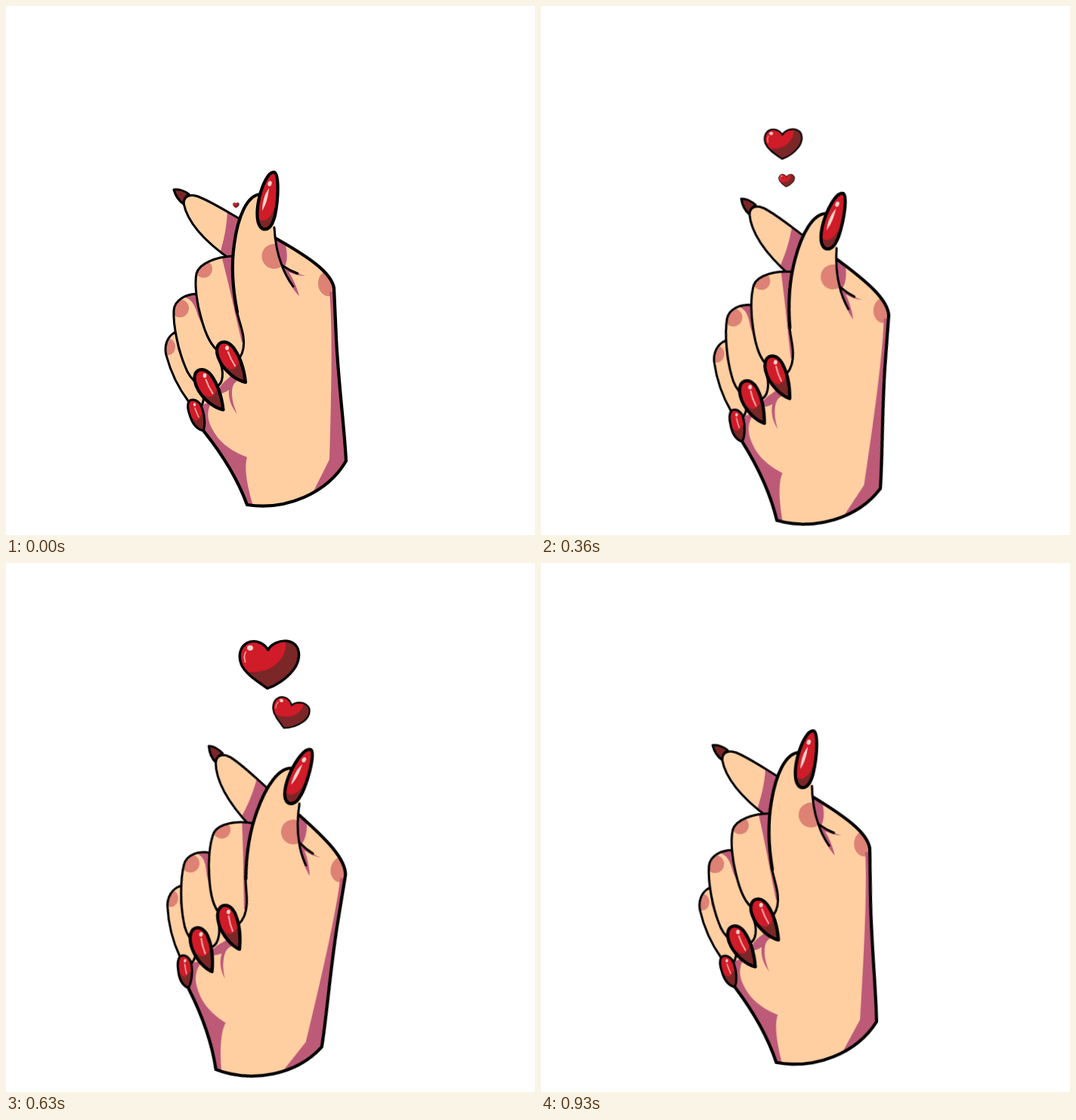
An HTML page for the animation above (0.96 s loop, 700x700 px).

```html
<!DOCTYPE html>
<html lang="en">
<head>
<meta charset="utf-8">
<title>Finger heart</title>
<style>
html, body { margin: 0; width: 100%; height: 100%; overflow: hidden; background: #fff; }
svg { display: block; width: 100vw; height: 100vh; }
path { stroke-linecap: round; stroke-linejoin: round; }
.skin { fill: #ffcfa2; }
.shade { fill: #bd5a78; }
.blush { fill: #dd8274; }
.red { fill: #d01b28; }
.dark { fill: #7b2727; }
.shine { fill: #f9d3cb; }
.glint { fill: none; stroke: #f3a9a4; stroke-width: 2.2; }
.line { fill: none; stroke: #000; stroke-width: 3; }
.bold { stroke-width: 4.2; }

.hand { transform-origin: 337.5px 440px; animation: sway 960ms infinite; }
.big { animation: rise 960ms infinite; }
.small { animation: drift 960ms infinite; }

/* Every segment advances in 30 ms steps. */
@keyframes sway {
  0%      { transform: translate(0, 0) rotate(0deg); animation-timing-function: steps(8); }
  25%     { transform: translate(-8.5px, 14.3px) rotate(15.8deg); animation-timing-function: steps(7); }
  46.875% { transform: translate(39.5px, 32px) rotate(0deg); animation-timing-function: steps(8); }
  71.875% { transform: translate(-8.5px, 14.3px) rotate(15.8deg); animation-timing-function: steps(9); }
  100%    { transform: translate(0, 0) rotate(0deg); }
}
@keyframes rise {
  0%      { transform: translate(304.3px, 263.5px) scale(.083); animation-timing-function: steps(8); }
  25%     { transform: translate(308.5px, 205.7px) scale(.362); animation-timing-function: steps(4); }
  37.5%   { transform: translate(320.5px, 182.5px) scale(.5); animation-timing-function: steps(5); }
  53.125% { transform: translate(336px, 155.5px) scale(.665); animation-timing-function: steps(4); }
  65.625% { transform: translate(348.3px, 134.2px) scale(.793); animation-timing-function: steps(6); }
  84.375% { transform: translate(363px, 96px) scale(1); animation-timing-function: steps(3); }
  93.74%  { transform: translate(370px, 73.5px) scale(1.105); animation-timing-function: step-end; }
  93.75%, 100% { transform: translate(370px, 73.5px) scale(0); animation-timing-function: step-end; }
}
@keyframes drift {
  0%, 24.99% { transform: translate(320.5px, 256px) rotate(-5deg) scale(0); animation-timing-function: step-end; }
  25%     { transform: translate(320.5px, 256px) rotate(-5deg) scale(.09); animation-timing-function: steps(4); }
  37.5%   { transform: translate(325px, 231px) rotate(2deg) scale(.21); animation-timing-function: steps(5); }
  53.125% { transform: translate(350.4px, 214px) rotate(10deg) scale(.37); animation-timing-function: steps(4); }
  65.625% { transform: translate(375.3px, 200px) rotate(18deg) scale(.495); animation-timing-function: steps(6); }
  84.375% { transform: translate(417.5px, 178.5px) rotate(27deg) scale(.67); animation-timing-function: steps(3); }
  93.74%  { transform: translate(443.5px, 168px) rotate(32deg) scale(.76); animation-timing-function: step-end; }
  93.75%, 100% { transform: translate(443.5px, 168px) rotate(32deg) scale(0); animation-timing-function: step-end; }
}
</style>
</head>
<body>
<svg viewBox="0 0 700 700">
  <defs>
    <path id="heartShape" d="M-2-24C-9-37-25-42-37-36C-49-29-52-15-47-1C-40 16-20 28-3 40C12 35 30 23 41 8C51-5 52-22 45-31C37-41 22-41 11-36C5-33 0-29-2-24Z"/>
    <path id="indexShape" d="M235 261C235 252 244 248 254 252C272 259 292 272 310 282L304 340L298 336C272 318 241 291 235 261Z"/>
    <path id="palmShape" d="M336 249C319 251 307 278 302 315C297 350 301 380 306 405L290 440L240 525L262 563C290 598 308 630 319 660C370 668 425 645 450 602C448 560 440 500 437 440L434 373C430 352 400 332 358 308L355 293L348 250Z"/>
    <path id="pinkyShape" d="M223 432C213 438 209 450 212 462C218 485 230 508 242 524L258 530C264 521 263 506 252 494L232 440Z"/>
    <path id="ringShape" d="M253 381C238 381 223 389 222 403C221 425 229 458 237 477C241 488 248 496 254 500L278 504C288 500 289 488 284 472L258 400Z"/>
    <path id="middleShape" d="M299 331C279 332 256 340 252 354C249 370 253 395 258 412C264 435 273 452 283 458L309 466C316 457 315 440 311 428C303 400 298 370 299 331Z"/>
    <path id="thumbNailShape" d="M355 220C361 222 361 252 356 277C352 293 346 297 340 295C331 291 331 272 335 254C339 237 347 219 355 220Z"/>
    <path id="nailShape" d="M280 450C284 442 294 443 301 452C309 463 315 480 317 498C304 495 291 484 284 472C279 463 278 455 280 450Z"/>
    <path id="pinkyNailShape" d="M242 523C248 518 256 523 259 531C263 541 264 555 261 562C252 560 246 551 243 541C240 533 240 527 242 523Z"/>

    <clipPath id="heartClip"><use href="#heartShape"/></clipPath>
    <clipPath id="indexClip"><use href="#indexShape"/></clipPath>
    <clipPath id="palmClip"><use href="#palmShape"/></clipPath>
    <clipPath id="pinkyClip"><use href="#pinkyShape"/></clipPath>
    <clipPath id="ringClip"><use href="#ringShape"/></clipPath>
    <clipPath id="middleClip"><use href="#middleShape"/></clipPath>
    <clipPath id="thumbNailClip"><use href="#thumbNailShape"/></clipPath>
    <clipPath id="nailClip"><use href="#nailShape"/></clipPath>
    <clipPath id="pinkyNailClip"><use href="#pinkyNailShape"/></clipPath>

    <g id="heart">
      <use href="#heartShape" class="red"/>
      <path class="dark" clip-path="url(#heartClip)" d="M27-42C33-8 0 20-44 11L-30 50H60V-42Z"/>
      <ellipse class="shine" cx="-32" cy="-27.5" rx="5" ry="4.3"/>
      <path class="glint" d="M-39-21C-42-16-42-10-40-4"/>
      <use href="#heartShape" class="line bold"/>
    </g>
    <g id="nail">
      <use href="#nailShape" class="red"/>
      <path class="dark" clip-path="url(#nailClip)" d="M280 466C292 482 304 488 309 468L322 475V502H290Z"/>
      <ellipse class="shine" cx="292.5" cy="452.5" rx="2.4" ry="3"/>
      <path class="glint" d="M294 458Q297 467 303 476"/>
      <use href="#nailShape" class="line bold"/>
    </g>
  </defs>

  <use class="big" href="#heart"/>
  <use class="small" href="#heart"/>

  <g class="hand">
    <!-- index finger -->
    <use href="#indexShape" class="skin"/>
    <path class="shade" clip-path="url(#indexClip)" d="M293 270C292 295 288 310 283 328L310 345V270Z"/>
    <use href="#indexShape" class="line"/>
    <path class="dark" d="M222 243C229 242 237 245 242 249C237 252 235 256 235 262C229 258 224 250 222 243Z"/>
    <path class="line" d="M222 243C229 242 237 245 242 249C237 252 235 256 235 262C229 258 224 250 222 243Z"/>

    <!-- palm and thumb -->
    <use href="#palmShape" class="skin"/>
    <g clip-path="url(#palmClip)">
      <path class="blush" d="M358 315A16.5 16.5 0 1 0 364 345Z"/>
      <ellipse class="blush" cx="427" cy="367" rx="14" ry="17"/>
      <path class="shade" d="M428 378C432 420 431 500 428 600L404 648L410 665H460V378Z"/>
      <path class="shade" d="M258 528L272 524C266 534 266 546 271 556C281 577 296 588 319 597C315 610 318 632 328 665H300L250 560Z"/>
      <path class="shade" d="M262 530L288 498L306 482L314 492C302 496 299 502 299 512C299 522 302 531 306 540C298 530 294 520 295 508C287 514 277 512 270 528Z"/>
      <path class="shade" d="M354 300L370 317C373 330 372 340 368 346C361 335 357 320 354 300Z"/>
    </g>
    <path class="shade" d="M365 343C376 351 386 355 397 357C388 357 380 355 374 352C380 361 385 372 388 384C380 375 370 362 365 343Z"/>
    <path class="line" d="M355 293C356 312 359 328 365 343C369 355 375 364 380 371M365 343Q375 350 386 354" stroke-width="2"/>
    <path class="line bold" d="M358 308C400 332 430 352 434 373L437 440C440 500 448 560 450 602C425 645 370 668 319 660C308 630 290 598 262 563"/>

    <!-- curled fingers -->
    <use href="#pinkyShape" class="skin"/>
    <g clip-path="url(#pinkyClip)">
      <ellipse class="blush" cx="215" cy="451" rx="9" ry="11"/>
      <path class="shade" d="M214 438L224 434L227 454L234 470V430H216Z"/>
    </g>
    <path class="line" d="M223 432C213 438 209 450 212 462C218 485 230 508 242 524M252 497C262 506 264 521 258 530"/>

    <use href="#ringShape" class="skin"/>
    <g clip-path="url(#ringClip)">
      <circle class="blush" cx="230" cy="400" r="12"/>
      <path class="shade" d="M234 385C246 387 250 396 254 410L268 440V375H240Z"/>
    </g>
    <path class="line" d="M253 381C238 381 223 389 222 403C221 425 229 458 237 477C241 488 248 496 254 500M282 468C289 484 288 500 278 504"/>

    <use href="#middleShape" class="skin"/>
    <g clip-path="url(#middleClip)">
      <circle class="blush" cx="261.500" cy="348" r="11.500"/>
      <path class="shade" d="M284 326C290 350 297 378 303 406L312 445H320V326Z"/>
    </g>
    <path class="line" d="M299 331C279 332 256 340 252 354C249 370 253 395 258 412C264 435 273 452 283 458M305 402C308 416 312 425 314 437C316 450 313 460 309 466"/>
    <path class="line bold" stroke-width="3.600" d="M336 249C319 251 307 278 302 315C297 350 301 380 306 405"/>

    <!-- nails -->
    <use href="#nail"/>
    <use href="#nail" x="-29.500" y="36.500"/>
    <use href="#pinkyNailShape" class="red"/>
    <path class="dark" clip-path="url(#pinkyNailClip)" d="M241 538C249 550 256 553 258 540L266 545V565H248Z"/>
    <ellipse class="shine" cx="249.500" cy="527.500" rx="1.700" ry="2.200"/>
    <path class="glint" d="M250 532Q252 538 255 544" style="stroke-width:1.600"/>
    <use href="#pinkyNailShape" class="line"/>

    <use href="#thumbNailShape" class="red"/>
    <path class="dark" clip-path="url(#thumbNailClip)" d="M330 280C341 288 350 284 357 262L362 270V300H330Z"/>
    <ellipse class="shine" cx="349" cy="235" rx="2.600" ry="3.600" transform="rotate(15 349 235)"/>
    <path class="shine" d="M348 241C347 252 344 263 339 271C339 260 342 249 348 241Z"/>
    <use href="#thumbNailShape" class="line bold"/>
  </g>
</svg>
</body>
</html>
```
